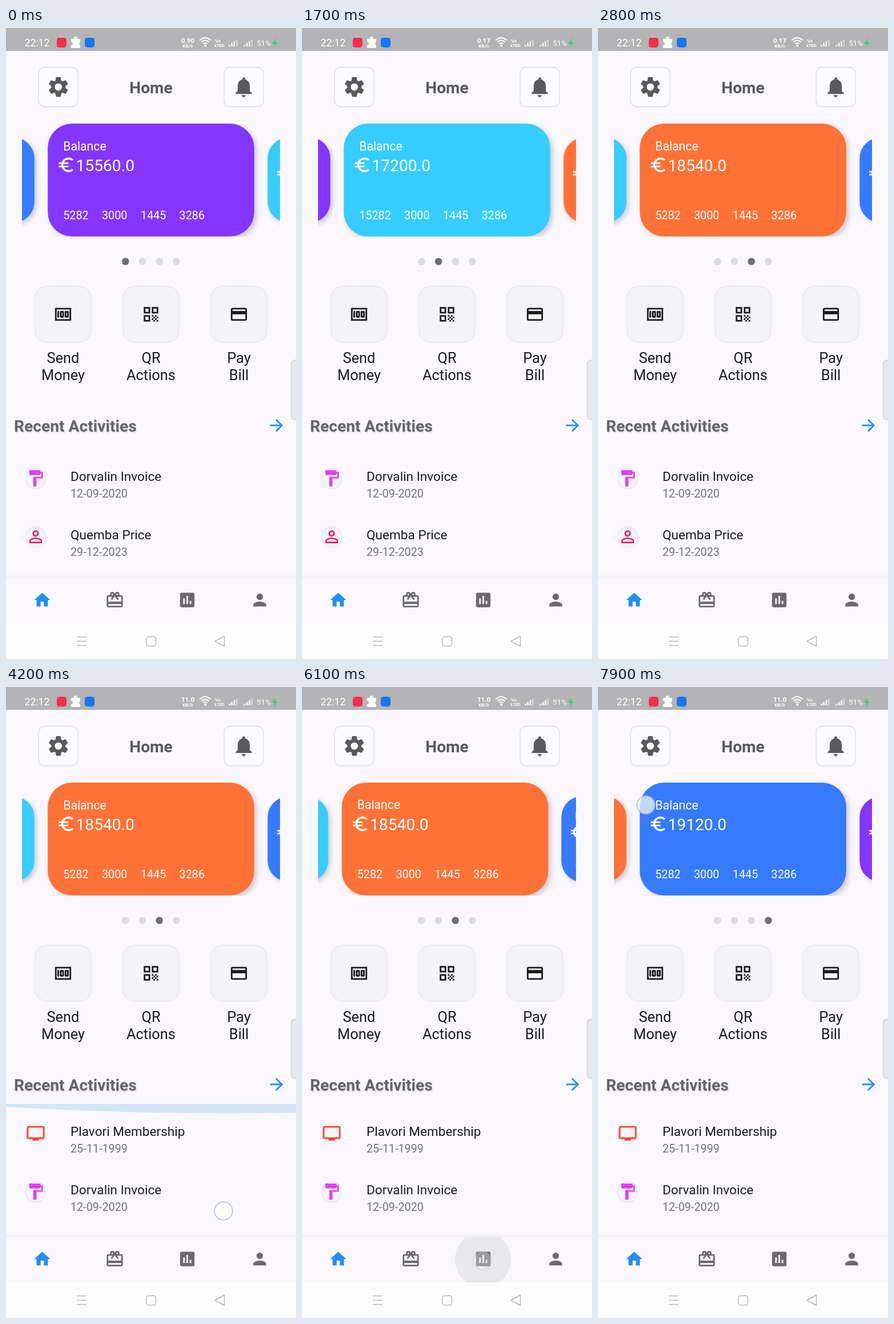
These frames come from a looping animation (508x1102 px, 8000 ms). An HTML page:

```html
<!DOCTYPE html>
<html lang="en">
<head>
<meta charset="utf-8">
<title>Wallet home screen</title>
<style>
html, body { margin: 0; width: 100%; height: 100%; overflow: hidden; background: #faf8fc; }
svg { display: block; width: 508px; height: 1102px; font-family: Roboto, sans-serif; }
.card rect { filter: drop-shadow(4px 4px 5px rgba(0, 0, 0, .2)); }
.soft { filter: drop-shadow(1px 2px 1px rgba(0, 0, 0, .12)); }
</style>
</head>
<body>
<svg id="stage" viewBox="0 0 508 1102"></svg>
<script>
const LOOP = 8000, STEP = 361.6, CARD_H = 197, ROW_H = 102;
const stage = document.getElementById('stage');

const ICONS = {
  bell: 'M12 22c1.1 0 2-.9 2-2h-4c0 1.1.89 2 2 2zm6-6v-5c0-3.07-1.64-5.64-4.5-6.32V4c0-.83-.67-1.5-1.5-1.5s-1.5.67-1.5 1.5v.68C7.63 5.36 6 7.92 6 11v5l-2 2v1h16v-1l-2-2z',
  home: 'M10 20v-6h4v6h5v-8h3L12 3 2 12h3v8z',
  gift: 'M20 6h-2.18c.11-.31.18-.65.18-1a2.996 2.996 0 0 0-5.5-1.65l-.5.67-.5-.68C10.96 2.54 10.05 2 9 2 7.34 2 6 3.34 6 5c0 .35.07.69.18 1H4c-1.11 0-1.99.89-1.99 2L2 19c0 1.11.89 2 2 2h16c1.11 0 2-.89 2-2V8c0-1.11-.89-2-2-2zm-5-2c.55 0 1 .45 1 1s-.45 1-1 1-1-.45-1-1 .45-1 1-1zM9 4c.55 0 1 .45 1 1s-.45 1-1 1-1-.45-1-1 .45-1 1-1zm11 15H4v-2h16v2zm0-5H4V8h5.08L7 10.83 8.62 12 11 8.76l1-1.36 1 1.36L15.38 12 17 10.83 14.92 8H20v6z',
  chart: 'M19 3H5c-1.1 0-2 .9-2 2v14c0 1.1.9 2 2 2h14c1.1 0 2-.9 2-2V5c0-1.1-.9-2-2-2zM9 17H7v-7h2v7zm4 0h-2V7h2v10zm4 0h-2v-4h2v4z',
  person: 'M12 12c2.21 0 4-1.79 4-4s-1.79-4-4-4-4 1.79-4 4 1.79 4 4 4zm0 2c-2.67 0-8 1.34-8 4v2h16v-2c0-2.66-5.33-4-8-4z',
  outline: 'M12 5.9c1.16 0 2.1.94 2.1 2.1s-.94 2.1-2.1 2.1S9.9 9.16 9.9 8s.94-2.1 2.1-2.1m0 9c2.97 0 6.1 1.46 6.1 2.1v1.1H5.9V17c0-.64 3.13-2.1 6.1-2.1M12 4C9.79 4 8 5.79 8 8s1.79 4 4 4 4-1.79 4-4-1.79-4-4-4zm0 9c-2.67 0-8 1.34-8 4v3h16v-3c0-2.66-5.33-4-8-4z',
  paint: 'M18 4V3c0-.55-.45-1-1-1H5c-.55 0-1 .45-1 1v4c0 .55.45 1 1 1h12c.55 0 1-.45 1-1V6h1v4H9v11c0 .55.45 1 1 1h2c.55 0 1-.45 1-1v-9h8V4h-3z',
  tv: 'M21 3H3c-1.1 0-2 .9-2 2v12c0 1.1.9 2 2 2h5v2h8v-2h5c1.1 0 2-.9 2-2V5c0-1.1-.9-2-2-2zm0 14H3V5h18v12z',
  money: 'M5 8h2v8H5zm7 0H9c-.55 0-1 .45-1 1v6c0 .55.45 1 1 1h3c.55 0 1-.45 1-1V9c0-.55-.45-1-1-1zm-1 6h-1v-4h1v4zm7-6h-3c-.55 0-1 .45-1 1v6c0 .55.45 1 1 1h3c.55 0 1-.45 1-1V9c0-.55-.45-1-1-1zm-1 6h-1v-4h1v4zM2 4v16h20V4H2zm2 14V6h16v12H4z',
  qr: 'M3 11h8V3H3v8zm2-6h4v4H5V5zM3 21h8v-8H3v8zm2-6h4v4H5v-4zM13 3v8h8V3h-8zm6 6h-4V5h4v4zM19 19h2v2h-2zM13 13h2v2h-2zM15 15h2v2h-2zM13 17h2v2h-2zM15 19h2v2h-2zM17 17h2v2h-2zM17 13h2v2h-2zM19 15h2v2h-2z',
  bill: 'M20 4H4c-1.11 0-1.99.89-1.99 2L2 18c0 1.11.89 2 2 2h16c1.11 0 2-.89 2-2V6c0-1.11-.89-2-2-2zm0 14H4v-6h16v6zm0-10H4V6h16v2z',
  arrow: 'M12 4l-1.41 1.41L16.17 11H4v2h12.17l-5.58 5.59L12 20l8-8z',
  euro: 'M15 18.5c-2.51 0-4.68-1.42-5.76-3.5H15v-2H8.58c-.05-.33-.08-.66-.08-1s.03-.67.08-1H15V9H9.24C10.32 6.92 12.5 5.5 15 5.5c1.61 0 3.09.59 4.23 1.57L21 5.3C19.41 3.87 17.3 3 15 3c-3.92 0-7.24 2.51-8.48 6H3v2h3.06c-.04.33-.06.66-.06 1s.02.67.06 1H3v2h3.52c1.24 3.49 4.56 6 8.48 6 2.31 0 4.41-.87 6-2.3l-1.78-1.77c-1.13.98-2.6 1.57-4.22 1.57z'
};

const CARDS = [
  ['#8436ff', '15560.0', '5282'],
  ['#37ccff', '17200.0', '15282'],
  ['#ff7237', '18540.0', '5282'],
  ['#367aff', '19120.0', '5282']
];
const ROWS = [
  ['tv', '#f44336', 'Plavori Membership', '25-11-1999'],
  ['paint', '#e040fb', 'Dorvalin Invoice', '12-09-2020'],
  ['outline', '#e91e63', 'Quemba Price', '29-12-2023']
];

// Markup helpers
const icon = (name, x, y, fill, size = 33.9) =>
  `<path transform="translate(${x - size / 2} ${y - size / 2}) scale(${size / 24})" fill="${fill}" d="${ICONS[name]}"/>`;
const text = (str, x, y, size, fill, more = '') =>
  `<text x="${x}" y="${y}" font-size="${size}" fill="${fill}" ${more}>${str}</text>`;
const box = (x, y, w, h, r, fill, more = '') =>
  `<rect x="${x}" y="${y}" width="${w}" height="${h}" rx="${r}" fill="${fill}" ${more}/>`;
const clip = (id, x, y, w, h) => `<clipPath id="${id}">${box(x, y, w, h, 0, '#000')}</clipPath>`;
const MID = 'text-anchor="middle"', BOLD = 'font-weight="700"';

function statusBar() {
  const bars = x => [0, 1, 2, 3].map(i =>
    box(x + i * 4.3, 29 - i * 2.9, 2.6, 3 + i * 2.9, 0, '#fff', `opacity="${i < 3 ? 1 : .45}"`)).join('');
  const arcs = [4, 8, 12].map(r =>
    `<path d="M${349 - r * .78} ${31 - r * .78}A${r} ${r} 0 0 1 ${349 + r * .78} ${31 - r * .78}"/>`).join('');
  return box(0, 0, 508, 40, 0, '#b4b3b5') +
    text('22:12', 32.5, 31.5, 17.6, '#fff') +
    box(89, 17, 17, 17, 4.5, '#f5304c') +
    '<path fill="#fff" d="M114 19h5a3.2 3.2 0 1 1 6 0h5v5.500a3.200 3.200 0 0 0 0 6V35h-16v-5a3 3 0 0 0 0-6z"/>' +
    box(138, 17, 17, 17, 4.5, '#1677f2') +
    text('', 318.500, 26, 11.5, '#fff', `id="speed" ${MID} ${BOLD}`) +
    text('KB/S', 318.5, 33.5, 8, '#fff', MID + BOLD.padStart(18)) +
    `<g fill="none" stroke="#fff" stroke-width="2.200">${arcs}</g><circle cx="349" cy="31" r="2" fill="#fff"/>` +
    text('Vo', 371, 25, 8, '#fff', `${MID} ${BOLD}`) +
    text('LTED', 374, 33, 7.5, '#fff', `${MID} ${BOLD}`) +
    bars(390) + bars(416.500) +
    text('51%', 439, 30.500, 13.5, '#fff') +
    '<path fill="#35d07a" d="M473 18l-7 9.500h4.500l-2 7.500 7.500-10h-4.500z"/>';
}

function header() {
  const frame = x => box(x, 68.500, 69, 69, 11, '#fbfafd', 'stroke="#dddce0" stroke-width="1.3"');
  const teeth = [0, 60, 120, 180, 240, 300].map(a =>
    `<path d="M10 2.600h4l.8 4.800h-5.600z" stroke-linejoin="round" stroke="#5a595b" stroke-width=".6" transform="rotate(${a} 12 12)"/>`).join('');
  return frame(57) + frame(382) +
    `<g transform="translate(70.500 81.800) scale(1.77)" fill="#5a595b">${teeth}<circle cx="12" cy="12" r="5.300" fill="none" stroke="#5a595b" stroke-width="3.400"/></g>` +
    icon('bell', 416.500, 103, '#5a595b', 42.400) +
    text('Home', 254, 114, 28.2, '#59585a', `${MID} ${BOLD}`);
}

function card([color, amount, first]) {
  const groups = [first, '3000', '1445', '3286'];
  let x = -153.8;
  const digits = groups.map(g => {
    const out = text(g, x, 0, 19.8, '#fff');
    x += g.length * 11.1 + 23.4;
    return out;
  }).join('');
  return `<g class="card">${box(-STEP / 2, 0, STEP, CARD_H, 42.300, color)}
    <g>${text('Balance', -153.8, 46.500, 21.2, '#fff')}${icon('euro', -148.8, 72, '#fff')}${text(amount, -131.5, 83, 28.2, '#fff')}</g>
    <g>${digits}</g></g>`;
}

function actions() {
  return [['money', 'Send', 'Money'], ['qr', 'QR', 'Actions'], ['bill', 'Pay', 'Bill']].map(([name, a, b], i) => {
    const x = 100 + i * 154;
    return box(x - 49, 451, 98, 98, 21, '#f4f3f6', 'stroke="#e6e5e8" stroke-width="1.3"') +
      icon(name, x, 500, '#1b1b1d') +
      text(a, x, 585, 25.4, '#1c1b1e', MID) + text(b, x, 615, 25.4, '#1c1b1e', MID);
  }).join('');
}

const row = ([name, color, title, date], i) => {
  const y = 780 + i * ROW_H;
  return `<circle cx="52" cy="${y}" r="17.800" fill="#f5f4f7" stroke="#e5e4e8" stroke-width="1.2"/>` +
    icon(name, 52, y - .5, color) +
    text(title, 113, y + 4, 22.6, '#1c1b1e') + text(date, 113, y + 32.5, 19.8, '#757478');
};

function bottomBars() {
  const nav = ['home', 'gift', 'chart', 'person'].map((n, i) =>
    icon(n, 63.5 + i * 127, 999, i ? '#6c6a6e' : '#2190f3')).join('');
  return box(0, 954, 508, 8, 0, 'url(#lift)') + box(0, 961, 508, 79, 0, '#faf8fc') + nav +
    '<circle id="ripple" cx="317" cy="1000" fill="#000" clip-path="url(#navClip)"/>' +
    box(0, 1040, 508, 62, 0, '#fefdfe') +
    `<g fill="none" stroke="#b9b8ba" stroke-width="1.5"><path d="M124 1063.500h17.500M124 1071h17.500M124 1078.500h17.500M366 1071l16.500-9v18z" stroke-linejoin="round"/>
    <rect x="246" y="1063" width="16.500" height="16.500" rx="4"/></g>`;
}

stage.innerHTML = `<defs>
  ${clip('cardClip', 28, 166, 452, 198.500)}${clip('listClip', 0, 728, 508, 233)}${clip('navClip', 0, 961, 508, 79)}
  <linearGradient id="lift" x2="0" y2="1"><stop stop-color="#faf8fc"/><stop offset="1" stop-color="#efedf1"/></linearGradient></defs>
  ${box(0, 0, 508, 1102, 0, '#faf8fc')}${statusBar()}${header()}
  <g clip-path="url(#cardClip)">${CARDS.map(card).join('')}</g>
  ${CARDS.map((c, i) => `<circle class="dot" cx="${209.3 + i * 29.7}" cy="407.700" r="6.300"/>`).join('')}
  ${actions()}
  ${text('Recent Activities', 14, 704.500, 28.2, '#656467', `${BOLD} class="soft"`)}${icon('arrow', 474, 694, '#2190f3')}
  <g clip-path="url(#listClip)"><g id="list">${ROWS.map(row).join('')}</g>
    <g fill="#d2e6f6"><path id="topGlow" transform="translate(0 728)"/><path id="endGlow" transform="translate(0 961) scale(1 -1)"/></g></g>
  ${bottomBars()}
  ${box(499.500, 580, 20, 104, 6, '#e7e6e9', 'stroke="#c9c8cb"')}
  <circle id="touch" r="15.800" fill="#fff" fill-opacity=".7" stroke="#a9b3e2" stroke-opacity=".7" stroke-width="2"/>`;

// Motion helpers
const clamp = v => Math.min(1, Math.max(0, v));
function bezier(x1, y1, x2, y2) {
  const at = (a, b, u) => 3 * a * u * (1 - u) ** 2 + 3 * b * u * u * (1 - u) + u ** 3;
  return x => {
    let lo = 0, hi = 1;
    for (let i = 0; i < 24; i++) {
      const m = (lo + hi) / 2;
      if (at(x1, x2, m) < x) lo = m; else hi = m;
    }
    return at(y1, y2, lo);
  };
}
const slide = bezier(.4, 0, .2, 1), shrink = bezier(0, 0, .58, 1);
const tween = (t, from, to) => slide(clamp((t - from) / (to - from)));

// Linear track through [time, value] points
function track(t, points) {
  const i = points.findIndex(p => p[0] > t);
  if (i < 0) return points[points.length - 1][1];
  if (!i) return points[0][1];
  const [a, v] = points[i - 1], [b, w] = points[i];
  return v + (w - v) * (t - a) / (b - a);
}

const SCROLL = [[3500, 95], [3950, 0], [4400, 0], [4600, 95], [4700, 95], [4840, 0]];
const TOP_GLOW = [[3950, 0], [4150, 20], [4450, 0], [4830, 0], [4900, 33], [5050, 33], [5750, 0]];
const END_GLOW = [[4580, 0], [4700, 26], [4900, 13], [5150, 0]];
const TOUCHES = [
  { x: 381, y: [[3500, 800], [4150, 915], [4400, 915], [4650, 800], [4700, 800], [4880, 896]], fade: [[3499, 0], [3500, 1], [4850, 1], [4900, .85], [5000, 0]] },
  { x: 316, y: [[0, 1001]], fade: [[5960, 0], [6000, .8], [6100, .5], [6200, 0]] },
  { x: 84, y: [[0, 206]], fade: [[7820, 0], [7880, 1]] }
];

const $ = id => document.getElementById(id);
const set = (el, attrs) => { for (const k in attrs) el.setAttribute(k, attrs[k]); };
const glow = d => `M0 0V${.3 * d}Q254 ${1.212 * d} 508 ${.936 * d}V0z`;
const cards = [...document.querySelectorAll('.card')], dots = [...document.querySelectorAll('.dot')];

function draw(t) {
  const page = tween(t, 480, 1380) + tween(t, 1830, 2760) + tween(t, 6050, 6850);
  cards.forEach((el, i) => {
    const off = (i - page + 6) % 4 - 2;
    const s = shrink(1 - .3 * Math.abs(off)), h = CARD_H * s;
    const [rect, top, end] = el.children;
    set(el, { transform: `translate(${254 + off * STEP} 265.5) scale(${s})` });
    set(rect, { y: -h / 2, height: h });
    set(top, { transform: `translate(0 ${-h / 2})` });
    set(end, { transform: `translate(0 ${h / 2 - 30})` });
  });
  dots.forEach((el, i) => set(el, { fill: i === Math.round(page) ? '#706f71' : '#dcdbde' }));

  $('speed').textContent = t < 1000 ? '0.90' : t < 4000 ? '0.17' : '11.0';
  set($('list'), { transform: `translate(0 ${-track(t, SCROLL)})` });
  set($('topGlow'), { d: glow(track(t, TOP_GLOW)) });
  set($('endGlow'), { d: glow(track(t, END_GLOW)) });
  set($('ripple'), {
    r: track(t, [[5950, 0], [6100, 49], [6250, 56]]),
    opacity: track(t, [[5950, .04], [6050, .068], [6150, .068], [6500, 0]])
  });

  const live = TOUCHES.find(p => track(t, p.fade) > 0);
  set($('touch'), live ? { cx: live.x, cy: track(t, live.y), opacity: track(t, live.fade) } : { opacity: 0 });
}

function tick() {
  draw(performance.now() % LOOP);
  requestAnimationFrame(tick);
}
tick();
</script>
</body>
</html>
```
